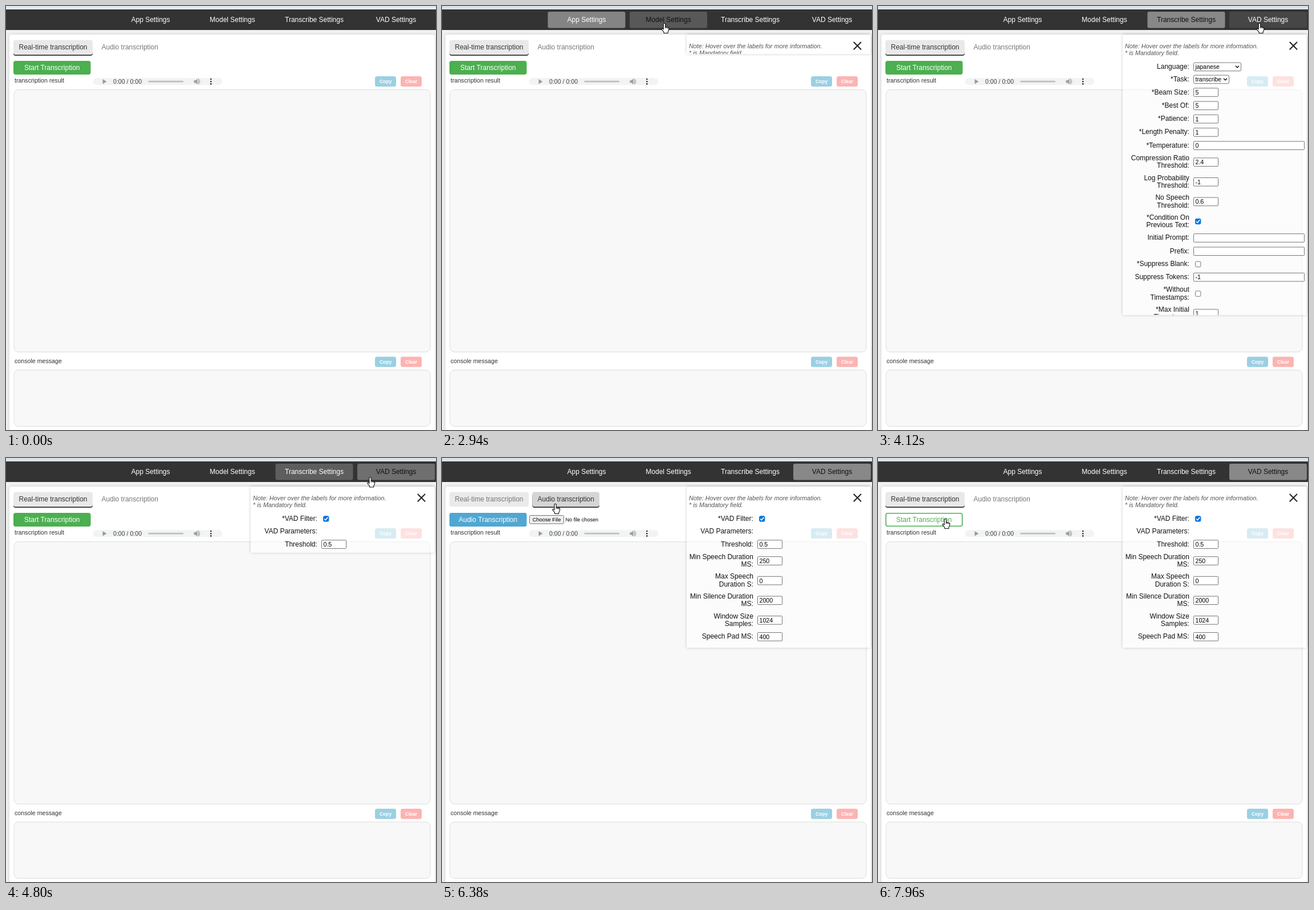
An HTML page with a canvas for the animation above (8 s loop, 754 by 742 pixels).

```html
<!DOCTYPE html>
<html lang="en">
<head>
<meta charset="utf-8">
<title>Transcription settings</title>
<style>
  html, body { margin: 0; width: 100%; height: 100%; overflow: hidden; background: #f1f1f1; }
  canvas { display: block; width: 754px; height: 742px; }
</style>
</head>
<body>
<canvas></canvas>
<script>
const W = 754, H = 742, LOOP = 8000;
const canvas = document.querySelector('canvas');
const c = canvas.getContext('2d');
const ratio = window.devicePixelRatio || 1;
canvas.width = W * ratio;
canvas.height = H * ratio;

// Screen refreshes: first, last, count
const REFRESHES = [[110, 880, 12], [950, 1700, 12], [1830, 2580, 12], [2780, 2780, 1],
  [2940, 3640, 11], [3770, 4330, 9], [4660, 5420, 12], [5490, 6250, 12],
  [6320, 7070, 12], [7140, 7890, 11], [7960, 7960, 1]];

// Pointer path: time, x, y
const PATH = [[110, 724, 736], [880, 206, 70], [1050, 208, 69], [1600, 273, 36],
  [1900, 274, 36], [2500, 390, 30], [2960, 390, 30], [3500, 535, 30], [3780, 535, 30],
  [4110, 669, 30], [4680, 669, 30], [5430, 214, 83], [5600, 199, 81], [6300, 199, 80],
  [6950, 108, 73], [7350, 108, 73], [7880, 118, 106]];

// Intervals in which the click marker shows
const CLICKS = [[1700, 1830], [2780, 2940], [3640, 3770], [4330, 4660], [6180, 6320], [7210, 7350]];

// Row: label, control kind, value, width. A label with "|" takes two lines.
const NAV = [
  { name: 'App Settings', x: 185.5, opens: 1830, rows: [
    ['*Audio Device:', 'select', 'default', 84], ['*Silence Limit:', 'input', '8'],
    ['*Create Audio|File:', 'check', true]] },
  { name: 'Model Settings', x: 329, opens: 2940, rows: [
    ['*Model Size Or|Path:', 'select', 'large-v2', 84], ['*Device:', 'select', 'auto', 50],
    ['*Device Index:', 'input', '0'], ['*Compute Type:', 'select', 'default', 64],
    ['*CPU Threads:', 'input', '0'], ['*Num Workers:', 'input', '1'],
    ['Download Root:', 'wide', '']] },
  { name: 'Transcribe Settings', x: 472.5, opens: 3770, rows: [
    ['Language:', 'select', 'japanese', 84], ['*Task:', 'select', 'transcribe', 63],
    ['*Beam Size:', 'input', '5'], ['*Best Of:', 'input', '5'], ['*Patience:', 'input', '1'],
    ['*Length Penalty:', 'input', '1'], ['*Temperature:', 'wide', '0'],
    ['Compression Ratio|Threshold:', 'input', '2.4'], ['Log Probability|Threshold:', 'input', '-1'],
    ['No Speech|Threshold:', 'input', '0.6'], ['*Condition On|Previous Text:', 'check', true],
    ['Initial Prompt:', 'wide', ''], ['Prefix:', 'wide', ''], ['*Suppress Blank:', 'check', false],
    ['Suppress Tokens:', 'wide', '-1'], ['*Without|Timestamps:', 'check', false],
    ['*Max Initial|Timestamp:', 'input', '1'], ['Prepend|Punctuations:', 'wide', '"\'([{-'],
    ['Append|Punctuations:', 'wide', '"\'.,!?:)]}']] },
  { name: 'VAD Settings', x: 616, opens: 4660, rows: [
    ['*VAD Filter:', 'check', true], ['VAD Parameters:', 'none'], ['Threshold:', 'input', '0.5'],
    ['Min Speech Duration|MS:', 'input', '250'], ['Max Speech|Duration S:', 'input', '0'],
    ['Min Silence Duration|MS:', 'input', '2000'], ['Window Size|Samples:', 'input', '1024'],
    ['Speech Pad MS:', 'input', '400']] },
];
const TABS = [
  { name: 'Real-time transcription', x: 13, w: 139 },
  { name: 'Audio transcription', x: 158.5, w: 117.5 },
];

const rowHeight = ([label, kind]) =>
  label.includes('|') ? 34.6 : kind === 'input' || kind === 'wide' ? 23.3 : 22;
for (const item of NAV) item.height = 53 + item.rows.reduce((sum, row) => sum + rowHeight(row), 0);

function snap(t) {
  const run = REFRESHES.findLast(r => r[0] <= t);
  if (!run) return 0;
  const [start, end, count] = run;
  const step = (end - start) / (count - 1) || 1;
  return start + Math.min(count - 1, Math.floor((t - start) / step + 1e-6)) * step;
}

function pointer(t) {
  if (t < PATH[0][0]) return { x: -99, y: -99 };
  const i = PATH.findLastIndex(k => k[0] <= t);
  const [t0, x0, y0] = PATH[i], [t1, x1, y1] = PATH[i + 1] || [LOOP, x0, y0];
  const p = (t - t0) / (t1 - t0), e = p * p * (3 - 2 * p);
  return { x: x0 + (x1 - x0) * e, y: y0 + (y1 - y0) * e };
}

const within = (p, x, y, w, h) => p.x >= x && p.x <= x + w && p.y >= y && p.y <= y + h;
const overNav = (item, p) => within(p, item.x, 10, 136, 28);
const overTab = (tab, p) => within(p, tab.x, 59.5, tab.w, 26);
const overStart = p => within(p, 13, 96, 136, 24);
const openItem = t => NAV.findLast(item => item.opens <= t);
const selectedTab = t => TABS[t >= 6320 && t < 7350 ? 1 : 0];

// A linear 300 ms transition equals the running mean of the shade
function fadedGray(shadeAt, t) {
  let sum = 0;
  for (let i = 0; i < 20; i++) sum += shadeAt(t - i * 15);
  const v = Math.round(sum / 20);
  return `rgb(${v},${v},${v})`;
}

function box(x, y, w, h, r, fill, stroke, lineWidth = 1) {
  const d = stroke ? lineWidth / 2 : 0;
  c.beginPath();
  c.roundRect(x + d, y + d, w - 2 * d, h - 2 * d, r);
  if (fill) { c.fillStyle = fill; c.fill(); }
  if (stroke) { c.strokeStyle = stroke; c.lineWidth = lineWidth; c.stroke(); }
}

function line(points, color, width) {
  c.beginPath();
  points.forEach(([x, y]) => c.lineTo(x, y));
  c.strokeStyle = color;
  c.lineWidth = width;
  c.stroke();
}

function text(str, x, y, size, color, align = 'left', style = '') {
  c.font = `${style} ${size}px "Liberation Sans", Arial, sans-serif`;
  c.textAlign = align;
  c.fillStyle = color;
  c.fillText(str, x, y + size * 0.35);
}

function shadow(color, blur, draw) {
  c.save();
  c.shadowColor = color;
  c.shadowBlur = blur * ratio;
  draw();
  c.restore();
}

function drawNav(t) {
  c.fillStyle = t < 110 ? '#e3eaf2' : '#dce2e8';
  c.fillRect(0, 0, W, 6);
  c.fillStyle = '#333';
  c.fillRect(0, 6, W, 36);
  for (const item of NAV) {
    const shade = s => openItem(s) === item ? 136 : overNav(item, pointer(s)) ? 85 : 51;
    box(item.x, 10, 136, 28.5, 3, fadedGray(shade, t));
    text(item.name, item.x + 68, 23.7, 12, openItem(t) === item ? '#111' : '#fff', 'center');
  }
}

function drawTabs(t, p) {
  for (const tab of TABS) {
    const active = selectedTab(t) === tab, hover = overTab(tab, p);
    const shade = s => selectedTab(s) === tab ? 233 : overTab(tab, pointer(s)) ? 212 : 255;
    if (active) box(tab.x, 62, tab.w, 25, 4, '#333');
    box(tab.x, 59.5, tab.w, 25.8, 4, fadedGray(shade, t));
    text(tab.name, tab.x + tab.w / 2, 72, 12, active || hover ? '#333' : '#777', 'center');
  }
}

function drawAction(t) {
  if (selectedTab(t) === TABS[1]) {
    box(13, 96, 135.5, 24, 3, '#50a7d2');
    text('Audio Transcription', 80.7, 107.7, 12, '#fff', 'center');
    box(153, 100, 61, 15.5, 2, '#efefef', '#767676');
    text('Choose File', 183.5, 107.7, 9.3, '#000', 'center');
    text('No file chosen', 216.5, 107.7, 9.1, '#000');
    return;
  }
  const hover = overStart(pointer(t - 65));
  box(13, 96, 135.5, 24, 3, hover ? '#fff' : '#4caf50', '#4caf50', 1.6);
  text('Start Transcription', 80.7, 107.7, 12, hover ? '#4caf50' : '#fff', 'center');
}

function drawPlayer() {
  box(152.5, 126, 226.5, 12.3, 6.1, '#f1f3f4');
  c.fillStyle = '#999b9b';
  c.fill(new Path2D('M169.5 128 L176.5 132.2 L169.5 136.5Z'));
  text('0:00 / 0:00', 188, 132.3, 10.6, '#444');
  box(249.5, 130.8, 61.5, 2.8, 1.4, '#bdbfc0');
  c.fillStyle = '#999b9b';
  c.fill(new Path2D('M329.5 130.2h2.6l3.2-3v10l-3.2-3h-2.6Z'));
  c.strokeStyle = '#999b9b';
  c.lineWidth = 1.1;
  c.stroke(new Path2D('M336.6 129.8q1.8 2.4 0 4.8M336.6 127.3q6.6 4.9 0 9.8'));
  for (const y of [128, 132.2, 136.4]) box(358, y - 1.3, 2.6, 2.6, 1.3, '#222');
}

function drawOutput(label, labelY, y, height) {
  text(label, 15, labelY, 10.65, '#333');
  for (const [name, x, color] of [['Copy', 647, '#9ad0e3'], ['Clear', 692, '#fcb4b1']]) {
    box(x, labelY - 7.7, 37, 18, 3.5, color);
    text(name, x + 18.5, labelY + 1.3, 8.5, '#fff', 'center', 'bold');
  }
  box(13.5, y, 731, height, 8, '#f8f8f8', '#ddd');
}

function drawControl([, kind, value, width], y) {
  if (kind === 'none') return;
  if (kind === 'check') {
    box(556, y - 5, 10.4, 10.4, 2, value ? '#0b76e0' : '#fff', value ? '#0b76e0' : '#767676');
    if (value) line([[558.2, y + 0.3], [560.3, y + 2.4], [564.2, y - 2.5]], '#fff', 1.5);
    return;
  }
  const w = kind === 'input' ? 44 : kind === 'wide' ? 195 : width;
  box(553, y - 7.6, w, 15.6, kind === 'select' ? 2 : 1, '#fff', '#767676');
  text(value, 556.5, y + 0.4, kind === 'select' ? 10.4 : 10.65, '#000');
  if (kind === 'select') {
    const x = 553 + w - 7;
    line([[x - 3, y - 1.4], [x, y + 1.6], [x + 3, y - 1.4]], '#111', 1.5);
  }
}

function drawPanel(t) {
  const item = openItem(t);
  if (!item) return;
  const height = 34 + (item.height - 34) * Math.min(1, (t - item.opens) / 420);
  c.save();
  const outside = new Path2D();
  outside.rect(0, 42, W, H);
  outside.rect(429, 50, 323, height);
  c.clip(outside, 'evenodd');
  shadow('rgba(0,0,0,.2)', 5, () => box(429, 50, 323, height, 2, '#fff'));
  c.restore();

  c.save();
  c.beginPath();
  c.rect(429, 50, 323, height);
  c.clip();
  c.fillStyle = 'rgba(255,255,255,.6)';
  c.fillRect(429, 50, 323, height);
  text('Note: Hover over the labels for more information.', 433, 70.3, 10.8, '#555', 'left', 'italic');
  text('* is Mandatory field.', 433, 82.5, 10.8, '#555', 'left', 'italic');
  line([[721.8, 63], [735, 76.2]], '#222', 2);
  line([[735, 63], [721.8, 76.2]], '#222', 2);
  let top = 95.2;
  for (const row of item.rows) {
    const middle = top + rowHeight(row) / 2;
    const lines = row[0].split('|');
    lines.forEach((part, i) =>
      text(part, 545.8, middle - 0.5 + (i - (lines.length - 1) / 2) * 13.5, 12, '#111', 'right'));
    drawControl(row, middle);
    top += rowHeight(row);
  }
  c.restore();
}

const HAND = new Path2D('M-1.7 1.3Q0-.9 1.6 1.3V6.2L6 7.2Q8.2 7.8 8 9.8L7.2 13.6 6 15.2V17.5H-1V15.6L-4.6 11.2Q-5.4 9.2-3.4 9.2L-1.7 10.8Z');
const KNUCKLES = new Path2D('M1.6 6v3M3.8 6.9v2.4M6 7.4v2.2');
const ARROW = new Path2D('M0 0V14.5L3.4 11.4 5.7 16.6 8 15.6 5.8 10.6H10.4Z');

function drawPointer(t, p) {
  if (CLICKS.some(([from, to]) => t >= from && t < to)) {
    box(p.x - 9, p.y - 9, 18, 18, 9, 'rgba(205,192,10,.72)');
  }
  const clickable = NAV.some(i => overNav(i, p)) || TABS.some(i => overTab(i, p)) || overStart(p);
  c.save();
  c.translate(p.x, p.y);
  c.fillStyle = '#fff';
  c.strokeStyle = '#111';
  c.lineWidth = 1.1;
  c.fill(clickable ? HAND : ARROW);
  c.stroke(clickable ? HAND : ARROW);
  if (clickable) c.stroke(KNUCKLES);
  c.restore();
}

function draw(now) {
  const t = snap(now % LOOP), p = pointer(t);
  c.setTransform(ratio, 0, 0, ratio, 0, 0);
  c.fillStyle = '#f1f1f1';
  c.fillRect(0, 0, W, H);
  shadow('rgba(0,0,0,.15)', 5, () => box(6, 50, 746, 720, 4, '#fff'));
  drawNav(t);
  drawTabs(t, p);
  drawAction(t);
  drawPlayer();
  drawOutput('transcription result', 130.7, 146, 460);
  drawOutput('console message', 621.5, 636.5, 99.5);
  drawPanel(t);
  drawPointer(t, p);
}

const began = performance.now();
function tick() {
  draw(performance.now() - began);
  requestAnimationFrame(tick);
}
tick();
</script>
</body>
</html>
```
